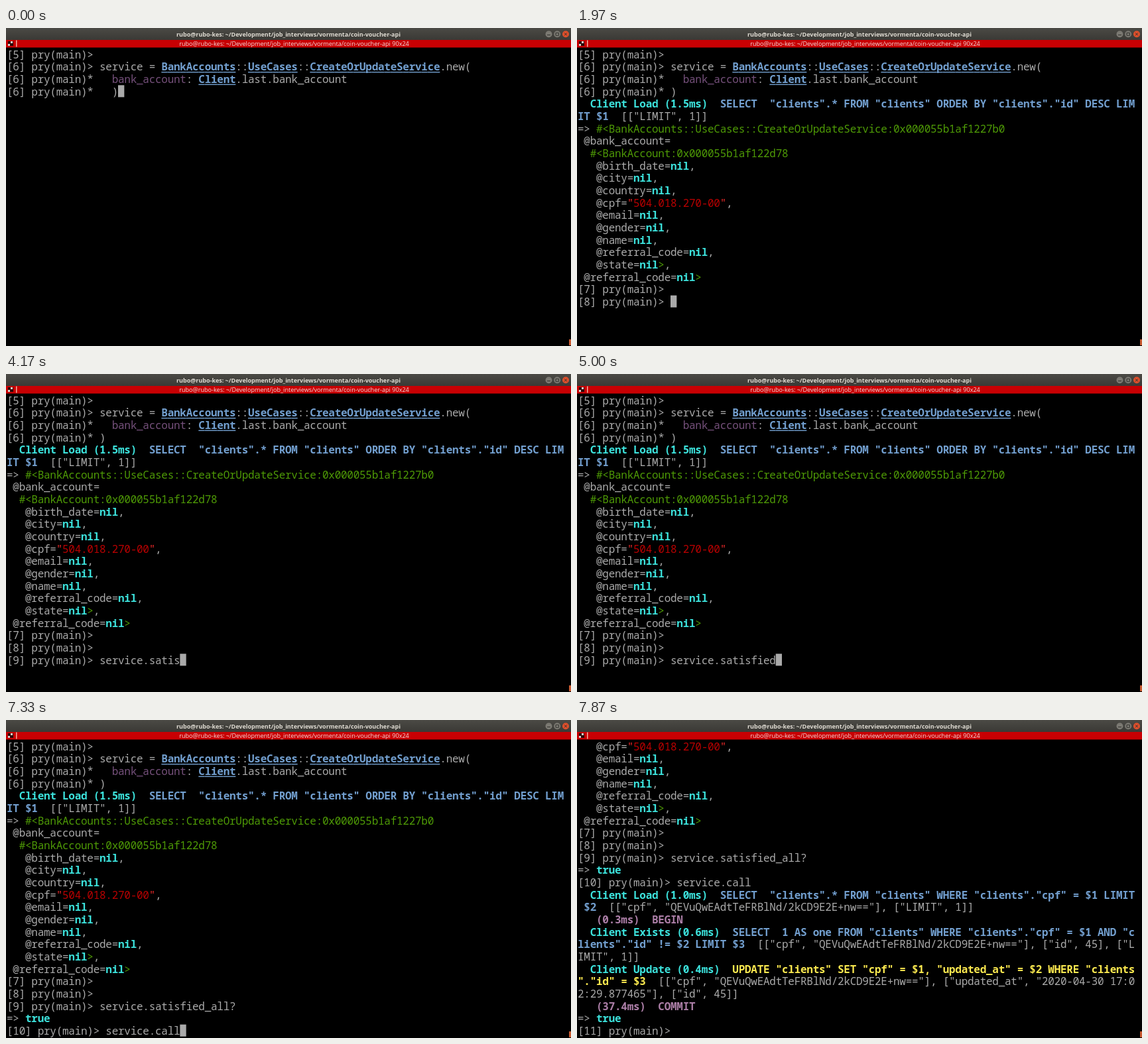
An HTML page with a canvas that plays this animation: 852 px wide and 480 px high, repeating every 8000 ms.

```html
<!DOCTYPE html>
<html lang="en">
<head>
<meta charset="utf-8">
<title>Terminal session</title>
<style>
html, body { margin: 0; width: 100%; height: 100%; overflow: hidden; background: #000; }
canvas { display: block; }
</style>
</head>
<body>
<canvas id="stage" width="852" height="480"></canvas>
<script>
const g = document.getElementById('stage').getContext('2d');
const LOOP = 8000, BLINK = 300, COLS = 90, ROWS = 24;
const CELL_W = 28 / 3, CELL_H = 56 / 3, LEFT = 1, TOP = 30.3;
const MONO = '16px "Noto Sans Mono", "DejaVu Sans Mono", monospace';
const UI = '"Open Sans", "Noto Sans", sans-serif';
const PATH = 'rubo@rubo-kes: ~/Development/job_interviews/vormenta/coin-voucher-api';

// "^x" inside terminal text switches to style x; a newline returns to k
const STYLES = {
  k: { color: '#aaaaaa' },
  g: { color: '#4e9a06' },
  m: { color: '#3ce2dc', bold: true },
  b: { color: '#729fcf', bold: true },
  u: { color: '#729fcf', bold: true, line: true },
  r: { color: '#b80000' },
  q: { color: '#ef2929' },
  n: { color: '#75507b' },
  p: { color: '#ad7fa8', bold: true },
  y: { color: '#fce94f', bold: true }
};

const field = (name, end = ',') => `   @${name}=^mnil^k${end}\n`.replace('>', '^g>^k');
const TOKEN = '[["cpf", "QEVuQwEAdtTeFRBlNd/2kCD9E2E+nw=="], ';

const intro = `[5] pry(main)>
[6] pry(main)> service = ^uBankAccounts^k::^uUseCases^k::^uCreateOrUpdateService^k.new(
[6] pry(main)*   ^nbank_account^k: ^uClient^k.last.bank_account
[6] pry(main)*   )`;

const loadQuery = '  ^mClient Load (1.5ms)  ^bSELECT  "clients".* FROM "clients" ORDER BY ' +
  '"clients"."id" DESC LIMIT $1^k  [["LIMIT", 1]]\n';

const object = '=> ^g#<BankAccounts::UseCases::CreateOrUpdateService:0x000055b1af1227b0\n' +
  ' @bank_account=\n  ^g#<BankAccount:0x000055b1af122d78\n' +
  ['birth_date', 'city', 'country'].map(n => field(n)).join('') +
  '   @cpf=^q"^r504.018.270-00^q"^k,\n' +
  ['email', 'gender', 'name', 'referral_code'].map(n => field(n)).join('') +
  field('state', '>,') + field('referral_code', '>').slice(2) + '[7] pry(main)> ';

// [time, text, quiet]: quiet output leaves the cursor's blink phase alone
const events = [[-170, intro]];
const say = (time, text, quiet) => events.push([time, text, quiet]);
const type = (text, ...times) => times.forEach((time, i) => say(time, text[i]));

say(330, '\r[6] pry(main)* )\n');
say(400, loadQuery);
say(460, object);
say(1970, '\n[8] pry(main)> ');
say(2130, '\n[9] pry(main)> ');
type('servic', 2330, 2430, 2530, 2600, 2700, 2900);
type('e.sa', 3170, 3230, 3330, 3430);
type('tis', 3670, 3900, 4130);
type('fie', 4330, 4530, 4770);
type('d_all?', 5000, 5070, 5170, 5270, 5330, 5470);
say(5670, '\n=> ^mtrue\n[10] pry(main)> ');
type('ser', 6270, 6500, 6730);
type('vice.call', 7000, 7040, 7080, 7130, 7170, 7200, 7240, 7290, 7330);
say(7570, '\n');
say(7600, '  ^mClient Load (1.0ms)  ^bSELECT  "clients".* FROM "clients" WHERE ' +
  `"clients"."cpf" = $1 LIMIT $2^k  ${TOKEN}["LIMIT", 1]]\n`, true);
say(7630, '   ^p(0.3ms)  BEGIN\n  ^mClient Exists (0.6ms)  ^bSELECT  1 AS one FROM "clients" WHERE ' +
  `"clients"."cpf" = $1 AND "clients"."id" != $2 LIMIT $3^k  ${TOKEN}["id", 45], ["LIMIT", 1]]\n`, true);
say(7670, '  ^mClient Update (0.4ms)  ^yUPDATE "clients" SET "cpf" = $1, "updated_at" = $2 WHERE ' +
  `"clients"."id" = $3^k  ${TOKEN}["updated_at", "2020-04-30 17:02:29.877465"], ["id", 45]]\n`, true);
say(7700, '   ^p(37.4ms)  COMMIT\n=> ^mtrue\n[11] pry(main)> ', true);

function layout(text) {
  const rows = [[]];
  let style = STYLES.k;
  for (let i = 0; i < text.length; i++) {
    const ch = text[i];
    if (ch === '^') style = STYLES[text[++i]];
    else if (ch === '\n') { rows.push([]); style = STYLES.k; }
    else if (ch === '\r') rows[rows.length - 1] = [];
    else {
      if (rows[rows.length - 1].length === COLS) rows.push([]);
      rows[rows.length - 1].push({ ch, style });
    }
  }
  return rows;
}

function box(color, x, y, w, h) {
  g.fillStyle = color;
  g.fillRect(x, y, w, h);
}

function label(text, font, color, x, y) {
  g.font = font;
  g.fillStyle = color;
  g.fillText(text, x, y);
}

function button(x, color, marks) {
  g.fillStyle = color;
  g.beginPath();
  g.arc(x, 9.3, 5, 0, 7);
  g.fill();
  g.strokeStyle = '#33322e';
  g.lineWidth = 1;
  g.stroke(new Path2D(marks));
}

function drawFrame() {
  const bar = g.createLinearGradient(0, 0, 0, 18);
  bar.addColorStop(0, '#4b4a45');
  bar.addColorStop(1, '#3a3935');
  box(bar, 0, 0, 852, 18);
  box('#c80003', 0, 18, 852, 11.5);
  g.textAlign = 'center';
  label(PATH, 'bold 9px ' + UI, '#dfdbd2', 426, 12.6);
  label(PATH + ' 90x24', '9.1px ' + UI, '#f4dede', 434.5, 26.8);
  g.textAlign = 'left';
  button(818.5, '#7b7972', 'M816 10.5h5');
  button(831.2, '#7b7972', 'M829 7.3h4.4v4h-4.4z');
  button(844, '#df4f2b', 'M842 7.3l4 4m0-4l-4 4');
  box('#2a0808', 3, 20, 8, 7);
  box('#d8d4d0', 7, 20, 3, 3);
  box('#d8d4d0', 3, 24, 3, 3);
  box('#f0b0a0', 15, 18.5, 1.5, 10);
  box('#c85a30', 849, 470, 3, 9);
}

function drawTerminal(t) {
  const past = events.filter(e => e[0] <= t);
  const rows = layout(past.map(e => e[1]).join(''));
  const shown = rows.slice(-ROWS);
  shown.forEach((row, r) => row.forEach(({ ch, style }, c) => {
    const x = LEFT + c * CELL_W, y = TOP + r * CELL_H + 15.2;
    if (ch !== ' ') label(ch, (style.bold ? 'bold ' : '') + MONO, style.color, x, y);
    if (style.line) box(style.color, x, y + 1.8, CELL_W, 1.4);
  }));
  const last = past.filter(e => !e[2]).pop()[0];
  if (Math.floor((t - last) / BLINK) % 2 === 0) {
    const r = shown.length - 1;
    box('#aaaaaa', LEFT + shown[r].length * CELL_W, TOP + r * CELL_H, CELL_W, CELL_H - 0.6);
  }
}

function tick(now) {
  box('#000', 0, 0, 852, 480);
  drawFrame();
  drawTerminal(Math.max(0, now - start) % LOOP);
  requestAnimationFrame(tick);
}

const start = performance.now();
tick(start);
</script>
</body>
</html>
```
